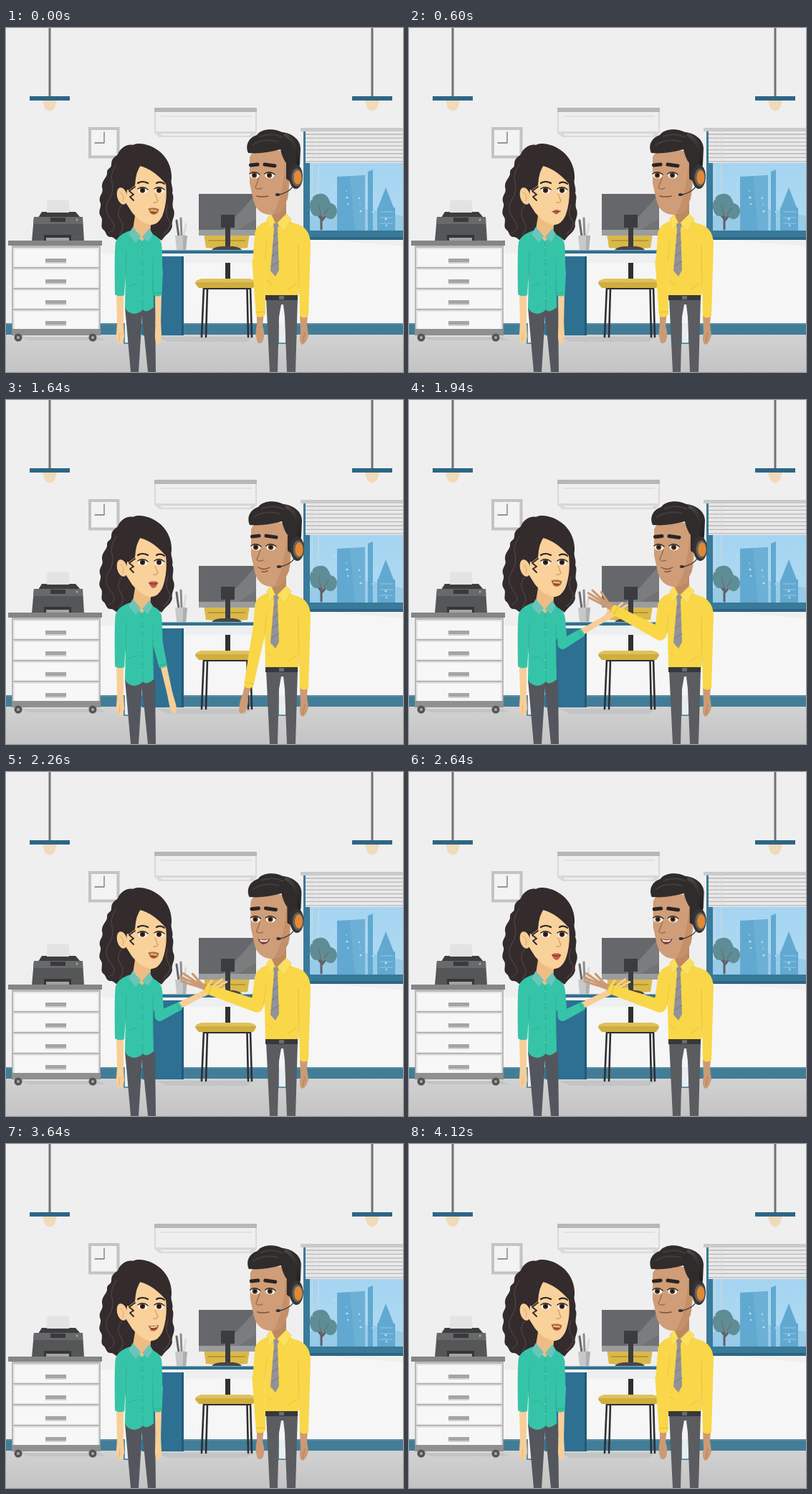
Recreate the animation shown at these times as an HTML page. Size 554 px wide and 479 px high, loop 4200 ms.

```html
<!DOCTYPE html>
<html lang="en">
<head>
<meta charset="utf-8">
<title>Office talk</title>
<style>
  html, body { margin: 0; width: 100%; height: 100%; overflow: hidden; background: #efefef; }
  svg { display: block; width: 554px; height: 479px; }
  .line { fill: none; stroke-linecap: round; stroke-linejoin: round; }
</style>
</head>
<body>
<svg viewBox="0 0 554 479" xmlns="http://www.w3.org/2000/svg">
  <defs>
    <linearGradient id="floor" x2="0" y2="1"><stop stop-color="#d2d2d2"/><stop offset="1" stop-color="#c3c3c3"/></linearGradient>
    <linearGradient id="sky" x2="0" y2="1"><stop stop-color="#a4d4f1"/><stop offset="1" stop-color="#b0daf2"/></linearGradient>
    <linearGradient id="band" x2="1" y2="1"><stop stop-color="#4a4646"/><stop offset="1" stop-color="#232121"/></linearGradient>
  </defs>

  <!-- room -->
  <path d="M0 0H554V412H0Z" fill="#efefef"/>
  <path d="M130 314H346L425 293L554 304V412H130Z" fill="#f6f6f6"/>
  <path d="M0 411H554V427H0Z" fill="#427d97"/>
  <path d="M0 411H554V413H0Z" fill="#5b8ea4"/>
  <path d="M0 427H554V479H0Z" fill="url(#floor)"/>
  <path d="M20 430H130L140 435H30ZM210 430H345L335 437H225Z" fill="#c3c4c5"/>
  <g id="lamps"></g>

  <!-- clock -->
  <path d="M117 140H156.500V179.500H117Z" fill="#f3f3f3" stroke="#c3c3c3" stroke-width="4"/>
  <path class="line" d="M137 145V160H124" stroke="#777" stroke-width="1.300"/>

  <!-- air conditioner -->
  <path d="M207 111H350V146L344 152H214L207 146Z" fill="#d9d9d9"/>
  <path d="M209 117H348V144H209Z" fill="#efefef"/>
  <path d="M207 111H350V117H207Z" fill="#b7b7b7"/>
  <path d="M216 123H343M214 146H343" stroke="#d3d3d3" fill="none"/>
  <path d="M215 147H342L339 150H218Z" fill="#ececec"/>

  <!-- window -->
  <path d="M415 144H554V295H415Z" fill="#397a9a"/>
  <path d="M424 187H554V282H424Z" fill="url(#sky)"/>
  <path d="M424 262Q475 240 554 262V282H424Z" fill="#97cbe8"/>
  <path d="M462 207L501 205V282H462ZM505 200L512 197V282H505ZM519 250L530 222L541 250ZM518 250H543V282H518Z" fill="#61a9d1"/>
  <path d="M480 206H501V282H487Z" fill="#6db0d5"/>
  <path d="M522 256H540M522 264H540M522 272H540" stroke="#84bedf" stroke-width="1.500"/>
  <g id="sparks" fill="#b5dff3"></g>
  <path class="line" d="M440 280L440 254M440 269L449 258M440 266L433 257" stroke="#615f68" stroke-width="3"/>
  <path d="M425 254C421 244 428 231 437 231C447 229 451 238 453 244C461 245 465 255 459 263C453 270 446 264 442 259C435 264 427 263 425 254Z" fill="#5f8d96"/>
  <path class="line" d="M440 262L436 246M441 264L450 251" stroke="#6a737a" stroke-width="1.500"/>
  <path d="M415 291H554V295H415Z" fill="#2c6683"/>
  <path d="M418 144H554V188H418Z" fill="#e9e9e9"/>
  <g id="blinds" stroke="#b6b6b6" stroke-width="1.300"></g>
  <path d="M427 144V240M436 144V230" stroke="#d8d8d8"/>
  <path d="M411 139H554V144H411Z" fill="#cacaca"/>

  <!-- printer -->
  <path d="M58 239H87L90 264H55Z" fill="#e5e5e5"/>
  <path d="M50 256H97L104 264H45Z" fill="#3d3d3f"/>
  <path d="M57 242H88V257H57Z" fill="#e3e3e3"/>
  <path d="M39 263H107L109 297H36Z" fill="#555658"/>
  <path d="M39 263H107V273H38Z" fill="#68696b"/>
  <path d="M62 264H83V270H62Z" fill="#3a3a3c"/>
  <path d="M53 288H91V297H53Z" fill="#353638"/>
  <path d="M56 292H88V297H56Z" fill="#a3a3a3"/>
  <circle cx="99" cy="267" r="1.500" fill="#89c56e"/>

  <!-- cabinet -->
  <path d="M9 303H131V421H9Z" fill="#f3f3f3" stroke="#a7a7a7" stroke-width="1.500"/>
  <path d="M3 296H134V303H3Z" fill="#858585"/>
  <path d="M8 303H132V306H8Z" fill="#b9b9b9"/>
  <g id="drawers"></g>
  <path d="M8 419H132V428H8Z" fill="#909090"/>
  <path d="M25 428H115V430H25Z" fill="#dedede"/>
  <g fill="#555"><circle cx="17" cy="431" r="5.500"/><circle cx="121" cy="431" r="5.500"/></g>
  <g fill="#aaa"><circle cx="17" cy="431" r="2"/><circle cx="121" cy="431" r="2"/></g>

  <!-- desk and chair -->
  <path d="M165 320H171V439H165ZM380 314H391V439H380Z" fill="#f4f4f4"/>
  <path d="M165 411V439H171M380 411V439H391V411" fill="#e8eef0" stroke="#397792" stroke-width="1.500"/>
  <path d="M276 286Q308 281 340 286L337 306Q308 309 279 306Z" fill="#dab849"/>
  <path d="M282 296H334" stroke="#b89932" stroke-width="2"/>
  <path d="M269 231H349V282H269Z" fill="#717274"/>
  <path d="M269 231H349V249L300 282H269Z" fill="#66676a"/>
  <path d="M349 231V265L323 282H303Z" fill="#7b7c7e"/>
  <path d="M269 281H349V289H269Z" fill="#9b9c9d"/>
  <path d="M300 260H319V278H313V306H306V278H300Z" fill="#3b3c40"/>
  <path d="M287 309Q291 304 304 304H317Q326 305 329 309Z" fill="#45464a"/>
  <path d="M156 314H372V327H156Z" fill="#edeff0"/>
  <path d="M156 309.500H372V314H156Z" fill="#2f7090"/>
  <path d="M190 318H247V428H190Z" fill="#2d7092"/>
  <path d="M245 318H248V428H245Z" fill="#215a77"/>
  <path d="M306 327H313V350H306Z" fill="#2f3033"/>
  <g class="line" stroke="#2e2e33" stroke-width="2.600">
    <path d="M276 361L273 430M281 363L279 430M336.500 363L338 430M341 361L343 430"/>
    <path d="M276 363H341" stroke-width="2"/>
  </g>
  <path d="M264 356Q264 350 273 350H340Q349 350 349 356L345 362H269Z" fill="#cfae40"/>
  <path d="M265 354Q268 349 275 349H339Q347 350 348 354Z" fill="#e0c25c"/>
  <g class="line" stroke-width="3"><path d="M241 290L238 268" stroke="#69696d"/><path d="M245 290L244 265" stroke="#8d8d91"/><path d="M248 290L251 273" stroke="#dbdbdb"/></g>
  <path d="M236 289H253L251 309H238Z" fill="#c7c8c9"/>
  <path d="M247 289H253L251 309H247Z" fill="#adafb0"/>

  <!-- woman -->
  <g id="woman">
    <path d="M147 190C147 181 152 180 156 176C160 165 172 161 177 163C186 158 203 163 213 171C224 179 232 194 231 210C229 217 234 222 232 230C236 237 230 245 234 253C237 262 230 268 232 276C230 285 223 287 217 296C212 291 206 294 200 288L172 290C166 296 162 288 158 294C153 298 151 290 146 291C139 291 140 283 136 281C130 276 137 268 132 262C127 254 135 249 131 242C129 233 137 230 134 222C133 212 142 208 141 201C141 195 147 196 147 190Z" fill="#332b2c"/>
    <g class="line" stroke="#514545" stroke-width="1.200">
      <path d="M154 190Q145 202 148 215T143 240T146 266T143 285M161 247Q153 257 160 268T158 288M226 246Q221 258 227 267T220 287"/>
    </g>
    <path d="M166 389H208L209 479H198L190 400L185 479H174Z" fill="#54565d"/>
    <path d="M154 371H164L164 410L165 430Q163 440 158 440Q153 436 154 426L155 410Z" fill="#f7ce97"/>
    <path d="M159 424L158 437" stroke="#dcad78" stroke-width=".8"/>
    <path d="M181 255H203L201 292L188 298L176 287Z" fill="#eebd84"/>
    <path d="M174 282Q157 287 153 298Q151 308 152 371Q158 375 165 372L167 340L166 389Q169 397 179 398Q187 397 191 392Q195 398 206 389L205 335L217 310Q216 292 200 284L190 297Z" fill="#36c4a8"/>
    <path class="line" d="M168 310L167 352M190 298L191 392M171 360L182 356M205 312L205 370" stroke="#28ac91" stroke-width=".8"/>
    <g id="buttons" fill="#7cdac6"></g>
    <path d="M177 277L188 290L181 299L171 287ZM200 279L190 291L198 298L205 287Z" fill="#6cc5bb"/>
    <g id="wUpper">
      <path d="M203 287Q217 291 217.500 305L218.500 340L205.500 340L204 306Z" fill="#36c4a8"/>
      <g id="wFore">
        <path d="M208 370H217L216 412H208.500Z" fill="#f7ce97"/>
        <path id="wShut" d="M208.500 408H216L217 427Q217 439 212 440Q207 437 208 424Z" fill="#f7ce97"/>
        <g id="wOpen" class="line" stroke="#f7ce97">
          <path d="M212 408V420" stroke-width="8.500"/><path d="M210 420L205 438M212 420V445M214 420L218 441M215 412L223 427" stroke-width="3"/>
        </g>
        <circle cx="212" cy="340" r="7" fill="#36c4a8"/>
        <path d="M205 339H219L217.500 372Q211 375 206 372Z" fill="#36c4a8"/>
        <path d="M206 369H217.500" stroke="#28ac91"/>
      </g>
    </g>
    <ellipse cx="162" cy="234" rx="7" ry="12" transform="rotate(-14 162 234)" fill="#f7ce97"/>
    <path d="M180 219Q180 198 187 192Q206 197 223 217Q226 241 218 262Q211 276 200 274Q186 270 176 257L167 243L169 225Z" fill="#f9d19b"/>
    <path class="line" d="M160 229Q166 234 163 241" stroke="#d7a36c"/>
    <path d="M152 194Q165 182 189 190Q181 199 180 219L171 226L164 222Z" fill="#332b2c"/>
    <path class="line" d="M180 221L172 227L178 232L173 235L178 240" stroke="#332b2c" stroke-width="2"/>
    <path class="line" d="M184 216Q190 212 198 216M210 216Q216 213 221 217" stroke="#2c2425" stroke-width="2.200"/>
    <g id="wEyes"></g>
    <path class="line" d="M208 231L212 241Q210 244 206 243" stroke="#d49c66" stroke-width="1.300"/>
    <g id="wMouths" transform="translate(206 255) scale(.78) translate(-206 -255)">
      <g><path d="M197 251Q206 249 215 252Q214 261 206 261Q199 259 197 251Z" fill="#8f4a2c"/><path d="M199 252Q206 251 213 253L212 256Q205 256 200 255Z" fill="#e9b968"/><path class="line" d="M197 251Q206 248 215 252M200 258Q206 263 213 257" stroke="#c0703f" stroke-width="1.500"/></g>
      <g><path d="M199 255Q206 250 212 255Q208 262 203 260Z" fill="#b5674d"/><path class="line" d="M198 256Q205 257 213 255" stroke="#6d3d31" stroke-width="1.300"/></g>
      <g><path d="M197 254Q203 250 206 252Q209 250 214 254Q211 264 205 264Q200 262 197 254Z" fill="#c55d4d"/><path class="line" d="M198 255Q206 258 213 255" stroke="#783530" stroke-width="1.400"/></g>
      <g><path d="M197 252Q206 254 215 251Q213 261 206 262Q199 260 197 252Z" fill="#9a4834"/><path d="M199 253Q207 255 213 252L212 255Q206 257 201 256Z" fill="#f8dcb4"/><path class="line" d="M200 260Q206 263 211 259" stroke="#c8694f" stroke-width="1.500"/></g>
    </g>
  </g>

  <!-- man -->
  <g id="man">
    <path d="M363 376H407L404 479H392L389 402L387 385H384L381 402L379 479H368Z" fill="#5b5c60"/>
    <path d="M410 399H421L420 413L422 428Q419 440 413 441Q408 437 411 424Z" fill="#cc9a74"/>
    <path d="M417 424L414 438" stroke="#a97753" stroke-width=".8"/>
    <path d="M368 268Q350 272 347 286L361 325L362 373H408L409 347L410 401Q416 406 422 401L425 300Q424 276 402 272L389 265Z" fill="#f9d748"/>
    <path class="line" d="M408 303L409 370M364 352L372 358M393 364L405 356" stroke="#e0bd38" stroke-width=".8"/>
    <path d="M362 372H407V379H362Z" fill="#37383b"/>
    <path d="M381 373H388V378H381Z" fill="#6b6c70"/>
    <path d="M372 242H391V266L377 279L370 268Z" fill="#bd8963"/>
    <path d="M370 259L376 272L366 282L364 266ZM391 259L378 272L389 283L398 266Z" fill="#fbe05e" stroke="#e3c345" stroke-width=".6"/>
    <path d="M373 272H380L379 281L381 337L376 346L369 338L374 281Z" fill="#929297"/>
    <path d="M373 290L379 286M372 304L380 298M371 318L380 312M370 332L381 325" stroke="#7f7f85" stroke-width="1.200"/>

    <g id="mHead">
      <path d="M340 180Q344 168 365 169L394 172Q398 205 394 233L386 253Q373 264 359 258Q348 253 345 239L340 216Z" fill="#cf9d77"/>
      <path d="M390 190L395 185L393 238L385 254L372 260Q385 240 390 190Z" fill="#c4906a"/>
      <path d="M338 174C333 162 340 152 350 149C356 140 374 139 385 145C397 146 411 154 411 168L410 190L397 214L391 210L391 188Q386 182 383 169Q358 176 338 174Z" fill="#302c2c"/>
      <path class="line" d="M344 163Q359 153 379 158M355 151Q371 145 385 152" stroke="#433d3d" stroke-width="2"/>
      <path class="line" d="M390 149Q408 158 407 193" stroke="url(#band)" stroke-width="5"/>
      <ellipse cx="404.500" cy="207" rx="9.500" ry="17" fill="#343436"/>
      <ellipse cx="406" cy="208" rx="7.500" ry="12.500" fill="#69615a"/>
      <ellipse cx="407" cy="208" rx="5.500" ry="9.800" fill="#e08a36"/>
      <path class="line" d="M400 221Q395 229 381 232" stroke="#3a3a3c" stroke-width="1.400"/>
      <ellipse cx="379" cy="232" rx="3.200" ry="2" fill="#333336"/>
      <path class="line" id="mBrows" d="M341.500 191L351 190M361 190L375 192" stroke="#292425" stroke-width="5"/>
      <g id="mEyes"></g>
      <path class="line" d="M353 209L348 222Q350 226 357 223" stroke="#9f6d4c" stroke-width="1.400"/>
      <g id="mMouths">
        <path class="line" d="M350 234Q358 236 366 234" stroke="#834e3c" stroke-width="1.500"/>
        <path class="line" d="M350 233Q358 238 366 233M355 239Q359 240 363 238" stroke="#834e3c" stroke-width="1.400"/>
        <g><path d="M350 232Q359 235 367 232Q364 240 357 240Q352 238 350 232Z" fill="#783d31"/><path d="M352 233Q359 236 365 233L363 236Q358 237 354 236Z" fill="#fff"/></g>
      </g>
    </g>

    <g id="mUpper">
      <path d="M367 269Q349 273 347 290L344 328H361L366 303Z" fill="#f9d748"/>
      <path class="line" d="M364 296L361 326" stroke="#e6c440" stroke-width=".8"/>
      <g id="mFore">
        <path id="mShut" d="M350 396H360L358 414Q362 426 359 435Q356 441 351 438Q347 426 350 413Z" fill="#cc9a74"/>
        <g id="mOpen" class="line" stroke="#cc9a74">
          <path d="M354 399V416" stroke-width="8.500"/><path d="M352 417L347 438M354 418L353 441M357 417L358 437M351 410L343 426" stroke-width="3.200"/>
        </g>
        <circle cx="352.500" cy="326" r="9" fill="#f9d748"/>
        <path d="M343.500 326H361.500L362 399Q356 405 349 401Z" fill="#f9d748"/>
        <path d="M349 396L361.500 395" stroke="#e0bd38"/>
      </g>
    </g>
  </g>
</svg>

<script>
const $ = id => document.getElementById(id);
const fill = (id, n, make) => { $(id).innerHTML = Array.from({ length: n }, (_, i) => make(i)).join(''); };

// Repeated parts
fill('lamps', 2, i => `<g transform="translate(${61 + i * 450})">
  <path d="M0 0V96" stroke="#707173" stroke-width="3"/>
  <path d="M-10 101H10L7 111Q0 120 -7 111Z" fill="#f0dab8"/>
  <path d="M-28 95H28V101H-28Z" fill="#2d6685"/></g>`);
fill('blinds', 8, i => `<path d="M418 ${148 + i * 5.4}H554"/>`);
fill('sparks', 14, i => `<circle cx="${456 + i * 37 % 92}" cy="${208 + i * 29 % 68}" r="${.8 + i % 3 * .4}"/>`);
fill('drawers', 4, i => {
  const y = 307 + i * 29;
  return `<path d="M11 ${y}H129V${y + 26}H11Z" fill="#f7f7f7" stroke="#d2d2d2"/>
    <path d="M10 ${y + 27}H130" stroke="#a3a3a3" stroke-width="1.500"/>
    <path d="M55 ${y + 14}H84V${y + 20}H55Z" fill="#a5a5a5"/>
    <path d="M55 ${y + 20}H84" stroke="#d2d2d2" stroke-width="2"/>`;
});
fill('buttons', 6, i => `<circle cx="190" cy="${306 + i * 14}" r=".8"/>`);

const eyes = (id, y, xs, iris) => fill(id, 2, i => `<g transform="translate(${xs[i]} ${y})">
  <ellipse rx="6.500" ry="4.600" fill="#fff"/><circle cx="-.5" r="3.700" fill="${iris}"/>
  <circle cx="-.5" r="1.900" fill="#171414"/>
  <path class="line" d="M-7 -2Q0 -7 7 -1" stroke="#292323" stroke-width="1.500"/></g>`);
eyes('wEyes', 226, [191, 214], '#493026');
eyes('mEyes', 205, [347, 368], '#5a3b25');

// Bursts of movement: start, end, steps
const LOOP = 4200;
const bursts = [
  [140, 290, 3], [450, 680, 4], [830, 1000, 3], [1150, 1390, 4],
  [1530, 1700, 3], [1860, 2090, 4], [2260, 2490, 4], [2640, 2810, 3],
  [2960, 3180, 4], [3330, 3500, 3], [3640, 3820, 3], [3970, 4120, 3]
];
const times = [0];
for (const [a, b, n] of bursts)
  for (let i = 0; i < n; i++) times.push(Math.floor((a + (b - a) * i / (n - 1)) / 10) * 10);

// Mouth shape for each step
const talkW = 'A DCB ADBA CAB BDAB ACD BADC ABDA CAD BADA CBA DAB CDA'.replace(/ /g, '');
const talkM = 'A AAA AAAA BCB CBCB CBC BBCB CBCB CBC BAAA AAA AAA AAA'.replace(/ /g, '');

// Keys: time, value
const gesture = (peak, rest) => [[0, 0], [1530, 0], [1920, peak], [2260, rest], [3180, rest], [3500, 0], [LOOP, 0]];
const tracks = {
  wFore: gesture(-118, -114),
  wUpper: gesture(-3, -3),
  mFore: gesture(117, 108),
  mUpper: gesture(3, 3),
  head: [[0, 0], [680, 0], [1150, 2], [1940, 2], [2640, .7], [3100, -.5], [3640, .8], [4120, 0], [LOOP, 0]],
  brows: [[0, 0], [680, 0], [1150, -1.5], [1940, -.5], [2640, 0], [LOOP, 0]]
};

function at(keys, t) {
  const i = keys.findIndex(k => k[0] > t);
  if (i < 1) return keys[i < 0 ? keys.length - 1 : 0][1];
  const [t0, v0] = keys[i - 1], [t1, v1] = keys[i];
  const u = (t - t0) / (t1 - t0);
  return v0 + (v1 - v0) * u * u * (3 - 2 * u);
}

const turn = (id, angle, x, y) => $(id).setAttribute('transform', `rotate(${angle} ${x} ${y})`);
const show = (el, on) => { el.style.display = on ? '' : 'none'; };
const speak = (id, letter) => [...$(id).children].forEach((el, i) => show(el, i === letter.charCodeAt(0) - 65));

function pose(step) {
  const t = times[step];
  const v = {};
  for (const name in tracks) v[name] = at(tracks[name], t);
  turn('wUpper', v.wUpper, 211, 295);
  turn('wFore', v.wFore, 212, 340);
  turn('mUpper', v.mUpper, 355, 284);
  turn('mFore', v.mFore, 352.5, 326);
  for (const who of ['w', 'm']) {
    const open = Math.abs(v[who + 'Fore']) > 40;
    show($(who + 'Open'), open);
    show($(who + 'Shut'), !open);
  }
  $('mHead').setAttribute('transform', `translate(${v.head})`);
  $('mBrows').setAttribute('transform', `translate(0 ${v.brows})`);
  speak('wMouths', talkW[step]);
  speak('mMouths', talkM[step]);
}

let last = -1;
const start = performance.now();
function tick() {
  const t = (performance.now() - start) % LOOP;
  let step = times.length - 1;
  while (times[step] > t) step--;
  if (step !== last) pose(last = step);
  requestAnimationFrame(tick);
}
tick();
</script>
</body>
</html>
```
